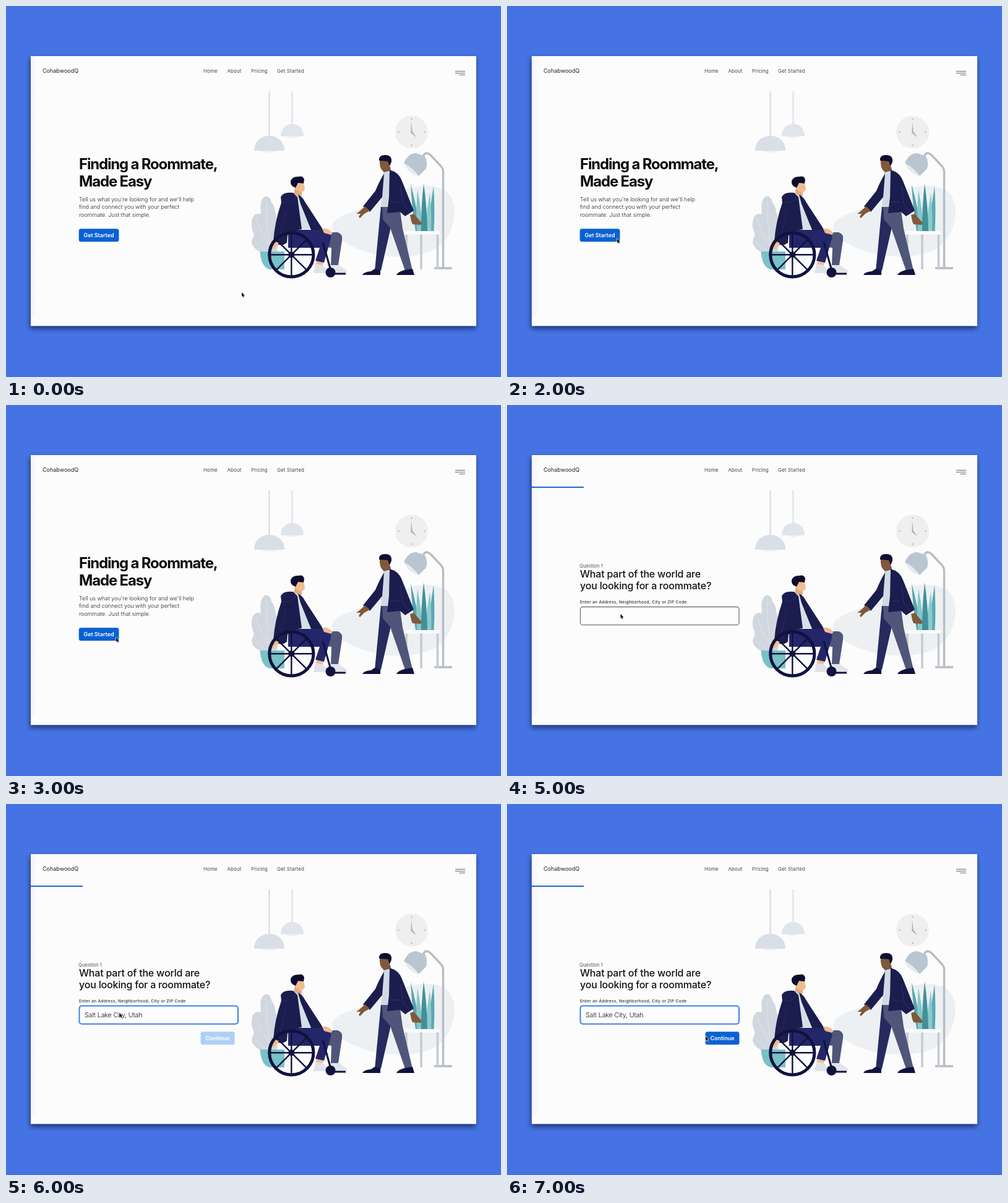
These frames come from a looping animation (800x600 px, 8000 ms). An HTML page with a canvas:

```html
<!DOCTYPE html>
<html lang="en">
<head>
<meta charset="utf-8">
<style>
html, body { margin: 0; width: 800px; height: 600px; overflow: hidden; background: #4573e3; }
canvas { display: block; }
</style>
</head>
<body>
<canvas id="stage" width="800" height="600"></canvas>
<script>
const ctx = document.getElementById('stage').getContext('2d');
const LOOP = 8000, STEP = 1000;
const NAVY = '#1b1d4e', INK = '#11123d', SLATE = '#50557a', BLUE = '#0a61d2';
const SKIN = '#f0bc90', BROWN = '#80593b', SHIRT = '#d6dfe8';

// One entry per held pose: cursor tip of each second.
const cursorTips = [[381, 463], [381, 463], [178, 376], [178, 376],
                    [178, 376.5], [183.5, 338], [183.5, 338], [321, 375.5]];

function fill(d, color) {
  ctx.fillStyle = color;
  ctx.fill(new Path2D(d));
}
function stroke(d, color, width, cap = 'butt') {
  ctx.strokeStyle = color;
  ctx.lineWidth = width;
  ctx.lineCap = cap;
  ctx.lineJoin = 'round';
  ctx.stroke(new Path2D(d));
}
function ellipse(x, y, rx, ry, color, turn = 0) {
  ctx.fillStyle = color;
  ctx.beginPath();
  ctx.ellipse(x, y, rx, ry, turn, 0, Math.PI * 2);
  ctx.fill();
}
function roundRect(x, y, w, h, r) {
  ctx.beginPath();
  ctx.roundRect(x, y, w, h, r);
}
function text(str, x, y, size, weight = 400, color = '#333', spacing = 0) {
  ctx.font = `${weight} ${size}px Inter, sans-serif`;
  ctx.letterSpacing = spacing + 'px';
  ctx.fillStyle = color;
  ctx.fillText(str, x, y);
}
function button(label, x, y, w, color, textX, textY) {
  ctx.fillStyle = color;
  roundRect(x, y, w, 21, 3.5);
  ctx.fill();
  text(label, textX, textY, 9, 600, '#fff', -0.05);
}

function drawPage() {
  ctx.fillStyle = '#4573e3';
  ctx.fillRect(0, 0, 800, 600);
  ctx.save();
  ctx.shadowColor = 'rgba(15, 30, 85, .75)';
  ctx.shadowBlur = 8;
  ctx.shadowOffsetX = -1;
  ctx.shadowOffsetY = 4;
  ctx.fillStyle = '#fcfcfc';
  ctx.fillRect(40, 81, 720, 436.5);
  ctx.restore();
  const edge = ctx.createLinearGradient(40, 0, 51, 0);
  edge.addColorStop(0, '#f3f3f4');
  edge.addColorStop(1, '#fcfcfc');
  ctx.fillStyle = edge;
  ctx.fillRect(40, 81, 11, 420);

  text('CohabwoodQ', 59, 108, 9, 400, '#222');
  [['Home', 319], ['About', 357.5], ['Pricing', 396], ['Get Started', 438]]
    .forEach(([label, x]) => text(label, x, 108, 8, 400, '#484848', 0.08));
  stroke('M726 105.5H742M726 108.5H742M732.5 111.5H742', '#666', 1.2);
}

function pendant(x, rodEnd, base, r, color) {
  stroke(`M${x} 138V${rodEnd}`, color, 2.4);
  ellipse(x, base, r * 0.55, 3, '#eef0f3');
  fill(`M${x - r} ${base}C${x - r} ${rodEnd - 8} ${x + r} ${rodEnd - 8} ${x + r} ${base}Z`, color);
}

function drawClock() {
  ellipse(655.5, 204, 26.5, 26.5, '#efefef');
  for (const [dx, dy] of [[0, -21], [21, 0], [0, 21], [-21, 0]])
    ellipse(655.5 + dx, 204 + dy, 1.4, 1.4, '#bdc5d0');
  fill('M655 187L656.8 203L663.5 212.5L654.2 205.5Z', '#adb6c6');
}

function spike(x, y, base, w, color) {
  const mid = (x + base) / 2;
  fill(`M${x} ${y}Q${mid + w} ${y + 38} ${base + w} 364H${base - w}Q${mid - w} ${y + 40} ${x} ${y}Z`, color);
}

function drawRoom() {
  fill('M527 357C529 336 576 332 610 312C650 288 690 286 711 299C732 316 727 355 710 378C690 406 640 411 590 400C558 391 526 374 527 357Z', '#edf0f2');
  pendant(425.5, 210, 234, 24.5, '#d9dee7');
  pendant(462.5, 192, 210.5, 18.5, '#e0e4eb');
  drawClock();

  stroke('M674 243Q679 234 686 241L703 259Q706.5 263 706.5 268V424M692 424H721', '#b8bcc3', 3.4);
  fill('M643 254Q650 238 663 238L677 243Q682 252 679 263L667 275Z', '#b9c6d1');
  fill('M643 254Q650 271 667 275Q658 262 643 254Z', '#e6ebef');

  spike(654, 288, 666, 4, '#54a4ad');
  spike(691, 291, 687, 4.5, '#58a9b1');
  spike(665, 297, 669, 5, '#87c5ca');
  spike(685, 302, 682, 5, '#8ccace');
  spike(675, 287, 676, 5, '#419099');

  stroke('M647 369V400M671 369V426M697.5 369V426', '#c3cbd2', 3.6);
  ctx.fillStyle = '#fbfbfb';
  ctx.fillRect(643, 364, 58, 5.5);

  fill('M416 400C400 394 394 384 399 375C403 369 398 365 397 357C396 342 402 333 411 337C413 331 410 326 412 318C415 304 427 304 429 318C436 325 434 334 438 343C444 358 440 374 438 400Z', '#d0d7df');
  stroke('M421 315Q420 350 427 398M404 344Q411 366 424 386M403 382Q412 388 422 398', '#e3e7ec', 0.9);
  fill('M410.5 397H450V426H426Q412 422 410.5 397Z', '#78c2c8');
}

function drawWheel() {
  const x = 461.3, y = 402.3;
  ctx.strokeStyle = INK;
  ctx.lineWidth = 5;
  ctx.beginPath();
  ctx.arc(x, y, 35.6, 0, Math.PI * 2);
  ctx.stroke();
  ctx.lineWidth = 2.4;
  for (let i = 0; i < 4; i++) {
    const dx = 35 * Math.cos(i * Math.PI / 4), dy = 35 * Math.sin(i * Math.PI / 4);
    ctx.beginPath();
    ctx.moveTo(x - dx, y - dy);
    ctx.lineTo(x + dx, y + dy);
    ctx.stroke();
  }
  ellipse(x, y, 5, 5, INK);
}

function drawSeated() {
  fill('M507 366L536 366Q545 369 543 379L537 419H525L526 391L498 388Z', SLATE);
  fill('M525 419H538L551 428V431H524Z', '#e2e4e9');
  fill('M503 410L514 413L511 421L500 418Z', SKIN);
  fill('M500 417L511 419L522 429V432H497Z', '#dfe2e8');
  fill('M456 362L516 362Q527 366 525 376L514 415L500 412L507 391H456Z', '#23276a');
  stroke('M512 382L525 428M526 433H549', INK, 3);
  ellipse(524.5, 431, 8, 8, INK);

  fill('M467 294H478V306L473 312L465 304Z', '#e5aa7e');
  fill('M468 285L481 286L483 296Q481 302 475 301L468 297Z', SKIN);
  fill('M460 283Q463 275 473 276Q480 274 482 281L481 287L472 286L468 294Q459 291 460 283Z', '#0c0d2e');
  fill('M465 303L476 309L492 361H470Z', SHIRT);
  fill('M444 309Q448 300 464 302L471 309L478 361Q466 362 455 371L454 383Q444 391 432 381Q434 350 445 318Z', NAVY);
  fill('M472 305Q479 308 484 318L510 358L512 362L493 362L476 320Z', NAVY);
  stroke('M447 318Q463 319 469 308M452 330Q448 356 440 381', '#2d3068', 0.8);
  fill('M511 360Q520 358 528 367L525 370L514 367Z', SKIN);
  fill('M430 379L441 383Q438 391 428 395L424 392Z', SKIN);
  drawWheel();
}

function drawStanding() {
  fill('M606 324H621L624 349L606 428H596Z', '#272a5f');
  fill('M608 324H636L641 360L657 428H645L621 359L609 345Z', SLATE);
  fill('M596 425L605 428L605 435H576Q578 430 590 429Z', INK);
  fill('M644 427L657 425L660 435H631Q633 430 644 427Z', INK);

  fill('M610 260H621L623 275L610 273Z', '#77513a');
  fill('M604 248H620V259Q618 268 609 267Q603 262 604 248Z', BROWN);
  fill('M603 250Q602 241 613 241Q624 241 623 252L620 259L617 251Z', '#0d0e31');
  fill('M610 269L622 266L634 325H606Z', '#cfdbe4');
  fill('M611 271L608 309L588 333L577 324L597 299Q604 282 611 271Z', NAVY);
  fill('M620 265Q635 269 640 283L659 331L645 340L637 333L616 335L619 309Z', NAVY);
  stroke('M638 292L641 320L653 334M621 317H635', '#343875', 0.8);
  fill('M580 324L588 331L579 336L572 343L570 341L573 336L566 336Q572 332 580 324Z', BROWN);
  fill('M653 338L659 336L666 344L672 351L670 354L657 353L655 348Z', BROWN);
}

function drawIntro() {
  text('Finding a Roommate,', 118, 264, 24, 700, '#0b0b0b', -1.18);
  text('Made Easy', 118, 292, 24, 700, '#0b0b0b', -1.18);
  ["Tell us what you're looking for and we'll help",
   'find and connect you with your perfect',
   'roommate. Just that simple.']
    .forEach((line, i) => text(line, 118, 315.5 + i * 12.6, 9, 300, '#222'));
  button('Get Started', 117.7, 360.3, 64.8, BLUE, 125.5, 374);
}

function drawQuestion(second) {
  const typed = second >= 6, ready = second >= 7;
  ctx.fillStyle = '#2b6cd2';
  ctx.fillRect(40, 131.9, 84, 2.2);
  text('Question 1', 117, 262.5, 7.7, 400, '#555');
  text('What part of the world are', 118, 279, 16, 500, '#111', -0.2);
  text('you looking for a roommate?', 118, 298, 16, 500, '#111', -0.2);
  text('Enter an Address, Neighborhood, City or ZIP Code', 118, 321, 6.7, 500, '#333', 0.25);
  ctx.strokeStyle = typed ? '#3a82e6' : '#777';
  ctx.lineWidth = typed ? 2 : 1.3;
  ctx.fillStyle = '#fdfdfd';
  roundRect(118.5, 326.5, 256.5, 29.2, 4);
  ctx.fill();
  ctx.stroke();
  if (!typed) return;
  text('Salt Lake City, Utah', 127, 345, 10.7, 300, '#111', -0.15);
  const x = ready ? 320.5 : 314.5;
  button('Continue', x, 368.3, 55, ready ? BLUE : '#aed0f4', x + 8, 382);
}

function drawCursor([x, y]) {
  ctx.save();
  ctx.translate(x, y);
  ctx.scale(0.93, 0.93);
  const arrow = 'M0 0V7.8L1.8 6.2L3 9L4.3 8.4L3.1 5.7H5.4Z';
  stroke(arrow, '#fff', 1.2);
  fill(arrow, '#111');
  ctx.restore();
}

function draw(now) {
  const second = Math.floor((now % LOOP) / STEP);
  drawPage();
  drawRoom();
  drawSeated();
  drawStanding();
  if (second < 4) drawIntro();
  else drawQuestion(second);
  drawCursor(cursorTips[second]);
}

const start = performance.now();
function tick() {
  draw(performance.now() - start);
  requestAnimationFrame(tick);
}
tick();
</script>
</body>
</html>
```
